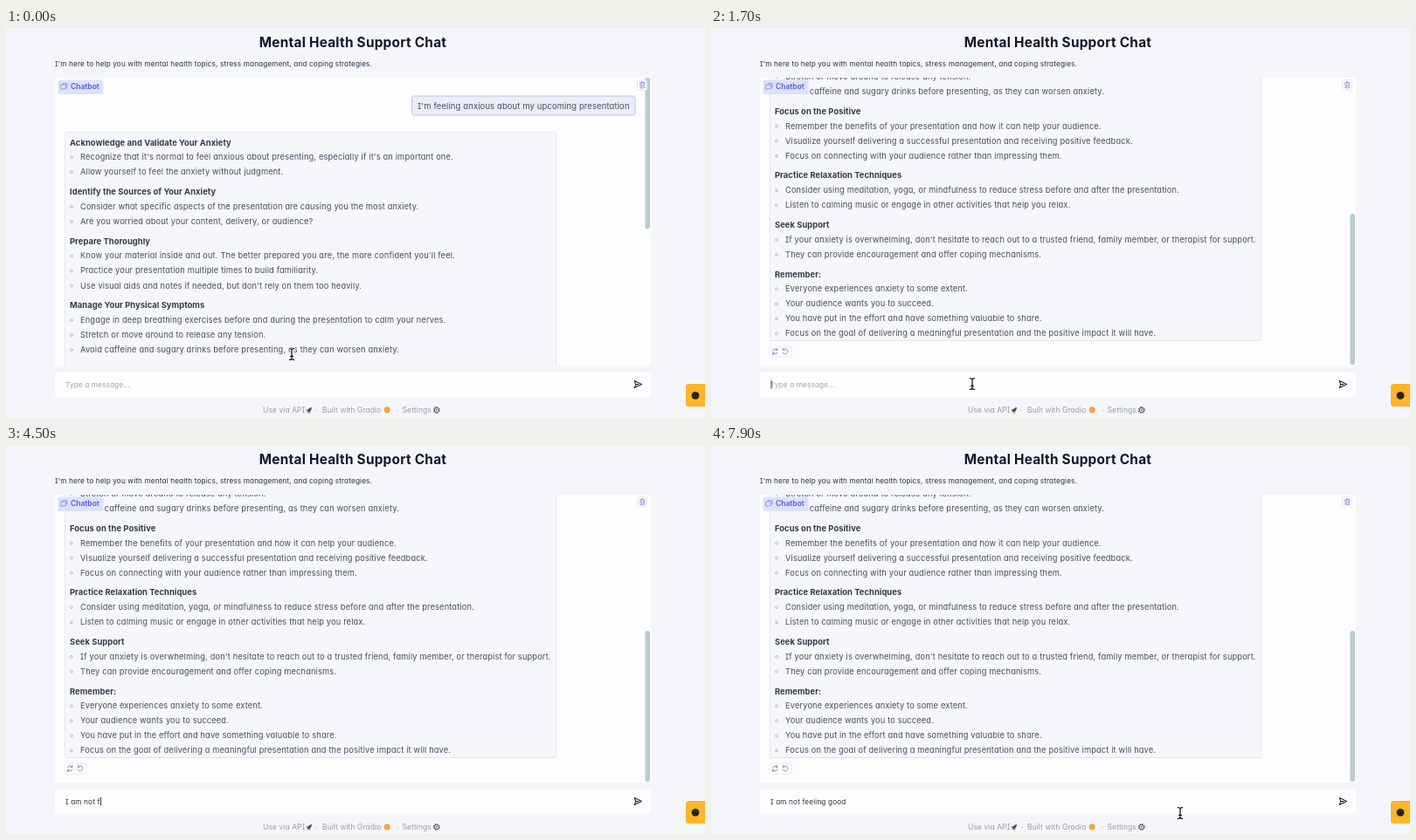
Animation of 800 by 446 pixels, one loop 8000 ms. Source, as an HTML page:

```html
<!DOCTYPE html>
<html lang="en">
<head>
<meta charset="utf-8">
<title>Support chat</title>
<style>
  html, body { margin: 0; width: 100%; height: 100%; overflow: hidden; background: #f4f6fb; }
  svg { display: block; width: 100vw; height: 100vh; }
  text { font-family: Inter, "Open Sans", sans-serif; font-feature-settings: "cv08", "cv11"; white-space: pre; }
  .title { font-size: 15.35px; font-weight: 700; letter-spacing: .25px; fill: #11162a; font-feature-settings: normal; }
  .small { font-size: 8.2px; letter-spacing: .14px; fill: #283042; }
  .head { font-size: 9.4px; font-weight: 700; letter-spacing: .05px; fill: #323a4c; font-feature-settings: normal; }
  .item { font-size: 9.25px; letter-spacing: .155px; fill: #454d5e; }
  .user { font-size: 9.45px; letter-spacing: .13px; fill: #454d5e; }
  .label { font-size: 8.5px; font-weight: 600; fill: #5659e0; font-feature-settings: normal; }
  .foot { font-size: 8.5px; letter-spacing: .07px; fill: #989eab; }
  .line { fill: none; stroke-linecap: round; stroke-linejoin: round; }
</style>
</head>
<body>
<svg viewBox="0 0 800 446" preserveAspectRatio="none">
  <defs>
    <clipPath id="view"><rect x="56" y="57" width="682" height="330"/></clipPath>
    <path id="beam" d="M-2.6-6.4Q-.4-6.4 0-5.2Q.4-6.4 2.6-6.4M0-5.2V5.2M-2.6 6.4Q-.4 6.4 0 5.2Q.4 6.4 2.6 6.4M-1.4 2.4h2.8"/>
  </defs>
  <rect width="800" height="446" fill="#f4f6fb"/>
  <text class="title" x="397" y="21.7" text-anchor="middle">Mental Health Support Chat</text>
  <text class="small" x="56" y="43.8">I'm here to help you with mental health topics, stress management, and coping strategies.</text>

  <rect x="56" y="57" width="682" height="330" fill="#fdfdfd"/>
  <g clip-path="url(#view)">
    <g id="chat">
      <rect x="464.5" y="78" width="255.5" height="22" rx="2.5" fill="#eaeef8" stroke="#bcc5dc"/>
      <text class="user" x="471" y="93.2">I'm feeling anxious about my upcoming presentation</text>
      <rect x="67.5" y="119.5" width="562" height="535" rx="2" fill="#f5f7fb" stroke="#e6e8ee"/>
      <path d="M68 654.5h561" stroke="#e1e4e9" stroke-width="1.2"/>
      <g id="answer"></g>
      <rect x="67" y="661" width="25.5" height="12" rx="2" fill="#fdfdfd" stroke="#e3e5ec" stroke-width=".8"/>
      <g class="line" stroke="#7f84c4" stroke-width=".9">
        <path d="M70.6 666a3 3 0 0 1 5.3-.9M76 663.4v2h-2M75.9 668a3 3 0 0 1-5.3.9M70.5 670.6v-2h2"/>
        <path d="M82.6 664.9a3 3 0 1 1-.5 3.2M82.3 663.2v2h2"/>
      </g>
    </g>
  </g>
  <rect id="thumb" x="731.5" y="57" width="5.5" height="173" rx="2.6" fill="#b9cccc"/>

  <rect x="59.5" y="59.5" width="52" height="16.6" rx="2" fill="#dde2fa"/>
  <path class="line" d="M63 65h5.6v4.6h-3.4l-1.2 1.3v-1.3h-1zM65 65v-1.4h5v4.2h-1.4" stroke="#868aec" stroke-width=".8"/>
  <text class="label" x="74" y="70.3">Chatbot</text>

  <rect x="722.5" y="59.5" width="11" height="12" rx="2" fill="#fdfdfd" stroke="#e3e5ec" stroke-width=".8"/>
  <path class="line" d="M725.2 63h6M726 63.2v5.6h4.4v-5.6M727.3 62.6v-1h1.8v1M727.4 64.8v2.4M729 64.8v2.4" stroke="#8489d8" stroke-width=".8"/>

  <rect x="56" y="395" width="682" height="28" rx="2" fill="#fefefe"/>
  <text id="typed" class="small" x="68" y="411.6"></text>
  <rect id="caret" y="404" width=".9" height="9.5" fill="#1f2637"/>
  <path class="line" d="M719.3 404.6l8.2 4-8.2 4 1.4-4zM720.8 408.6h3" stroke="#20283a" stroke-width="1.1"/>

  <text class="foot" x="294" y="441">Use via API</text>
  <g transform="translate(347.2 438) rotate(42)">
    <path d="M0-4.4Q2.2-1.8 1.7 2.4h-3.4Q-2.2-1.8 0-4.4z" fill="#4b4d58"/>
    <path d="M-1.7 0l-1.6 2.8 1.6-.3zM1.7 0l1.6 2.8-1.6-.3z" fill="#d8583a"/>
    <path d="M-1 2.8h2L0 5z" fill="#f5a623"/>
  </g>
  <text class="foot" x="354.6" y="441">·</text>
  <text class="foot" x="362" y="441">Built with Gradio</text>
  <circle cx="436.2" cy="437.8" r="3.6" fill="#f8a53a"/>
  <text class="foot" x="447" y="441">·</text>
  <text class="foot" x="453.6" y="441">Settings</text>
  <g transform="translate(492.8 438)">
    <circle r="2.6" fill="none" stroke="#636977" stroke-width="1.3"/>
    <circle r="3.5" fill="none" stroke="#636977" stroke-width="1.1" stroke-dasharray="1.37 1.37"/>
    <circle r=".9" fill="#636977"/>
  </g>

  <path d="M800 408h-18.5a3.5 3.5 0 0 0-3.5 3.5v19a3.5 3.5 0 0 0 3.5 3.5H800z" fill="#fdb52a"/>
  <circle cx="789" cy="421.3" r="4.4" fill="#2a2418"/>

  <g id="pointer" class="line">
    <use href="#beam" stroke="#fff" stroke-width="2.6"/>
    <use href="#beam" stroke="#10131c" stroke-width="1.3"/>
  </g>
</svg>
<script>
const LOOP = 8000, STEP = 100, SCROLL = 296, THUMB = 156;
const MESSAGE = "I am not feeling good";
const $ = id => document.getElementById(id);

const ADVICE = [
  ["Acknowledge and Validate Your Anxiety",
    "Recognize that it's normal to feel anxious about presenting, especially if it's an important one.",
    "Allow yourself to feel the anxiety without judgment."],
  ["Identify the Sources of Your Anxiety",
    "Consider what specific aspects of the presentation are causing you the most anxiety.",
    "Are you worried about your content, delivery, or audience?"],
  ["Prepare Thoroughly",
    "Know your material inside and out. The better prepared you are, the more confident you'll feel.",
    "Practice your presentation multiple times to build familiarity.",
    "Use visual aids and notes if needed, but don't rely on them too heavily."],
  ["Manage Your Physical Symptoms",
    "Engage in deep breathing exercises before and during the presentation to calm your nerves.",
    "Stretch or move around to release any tension.",
    "Avoid caffeine and sugary drinks before presenting, as they can worsen anxiety."],
  ["Focus on the Positive",
    "Remember the benefits of your presentation and how it can help your audience.",
    "Visualize yourself delivering a successful presentation and receiving positive feedback.",
    "Focus on connecting with your audience rather than impressing them."],
  ["Practice Relaxation Techniques",
    "Consider using meditation, yoga, or mindfulness to reduce stress before and after the presentation.",
    "Listen to calming music or engage in other activities that help you relax."],
  ["Seek Support",
    "If your anxiety is overwhelming, don't hesitate to reach out to a trusted friend, family member, or therapist for support.",
    "They can provide encouragement and offer coping mechanisms."],
  ["Remember:",
    "Everyone experiences anxiety to some extent.",
    "Your audience wants you to succeed.",
    "You have put in the effort and have something valuable to share.",
    "Focus on the goal of delivering a meaningful presentation and the positive impact it will have."]
];

function add(name, attrs, text = "") {
  const el = document.createElementNS("http://www.w3.org/2000/svg", name);
  for (const key in attrs) el.setAttribute(key, attrs[key]);
  el.textContent = text;
  $("answer").append(el);
}

let y = 131;
for (const [heading, ...items] of ADVICE) {
  add("text", { class: "head", x: 73, y: y + 3.5 }, heading);
  for (const item of items) {
    y += 17.03;
    add("circle", { cx: 75, cy: y + .3, r: 1.4, fill: "none", stroke: "#9aa1b0", "stroke-width": .7 });
    add("text", { class: "item", x: 85, y: y + 3.3 }, item);
  }
  y += 22.5;
}

const clamp = v => Math.max(0, Math.min(1, v));
const ease = v => v * v * (3 - 2 * v);
const progress = (t, from, to) => clamp((t - from) / (to - from));

// Piecewise-linear value through [time, value] points.
function track(points, t) {
  let value = points[0][1];
  for (let i = 1; i < points.length; i++) {
    const [t0, a] = points[i - 1], [t1, b] = points[i];
    if (t >= t0) value = a + (b - a) * progress(t, t0, t1);
  }
  return value;
}

const KEYS = [[2300, 0], [2500, 1], [3600, 6], [5250, 14], [6450, 18], [7100, 21]];
const FOCUS = 1300, TYPING = 2500, DONE = 7100, WAKE = 7500;

// The pointer rests while the list scrolls, goes to the input, then heads for the send button.
function pointerAt(t) {
  const down = ease(progress(t, 600, 900));
  const away = progress(t, WAKE, 7900) ** 1.5;
  return [327 - 28 * down + 238 * away, 374 + 34 * down + 14 * away];
}

function caretOn(t) {
  if (t < FOCUS) return false;
  if (t < TYPING) return (t - FOCUS) % 1000 < 500;
  return t < DONE || (t - DONE) % 1000 < 500;
}

function draw(t) {
  const p = ease(progress(t, 300, 700));
  $("chat").setAttribute("transform", `translate(0 ${-SCROLL * p})`);
  $("thumb").setAttribute("y", 57 + THUMB * p);

  const count = Math.floor(track(KEYS, t) + 1e-6);
  const typed = $("typed");
  typed.textContent = count ? MESSAGE.slice(0, count) : "Type a message...";
  typed.style.fill = count ? "#283042" : "#9ba1ad";
  $("caret").setAttribute("x", 68.6 + (count ? typed.getComputedTextLength() : 0));
  $("caret").style.display = caretOn(t) ? "" : "none";

  const [px, py] = pointerAt(t);
  $("pointer").setAttribute("transform", `translate(${px} ${py})`);
  $("pointer").style.display = t < TYPING || t > WAKE ? "" : "none";
}

const start = performance.now();
function tick(now) {
  const t = Math.max(0, now - start) % LOOP;
  draw(Math.floor(t / STEP) * STEP);
  requestAnimationFrame(tick);
}
draw(0);
requestAnimationFrame(tick);
</script>
</body>
</html>
```
